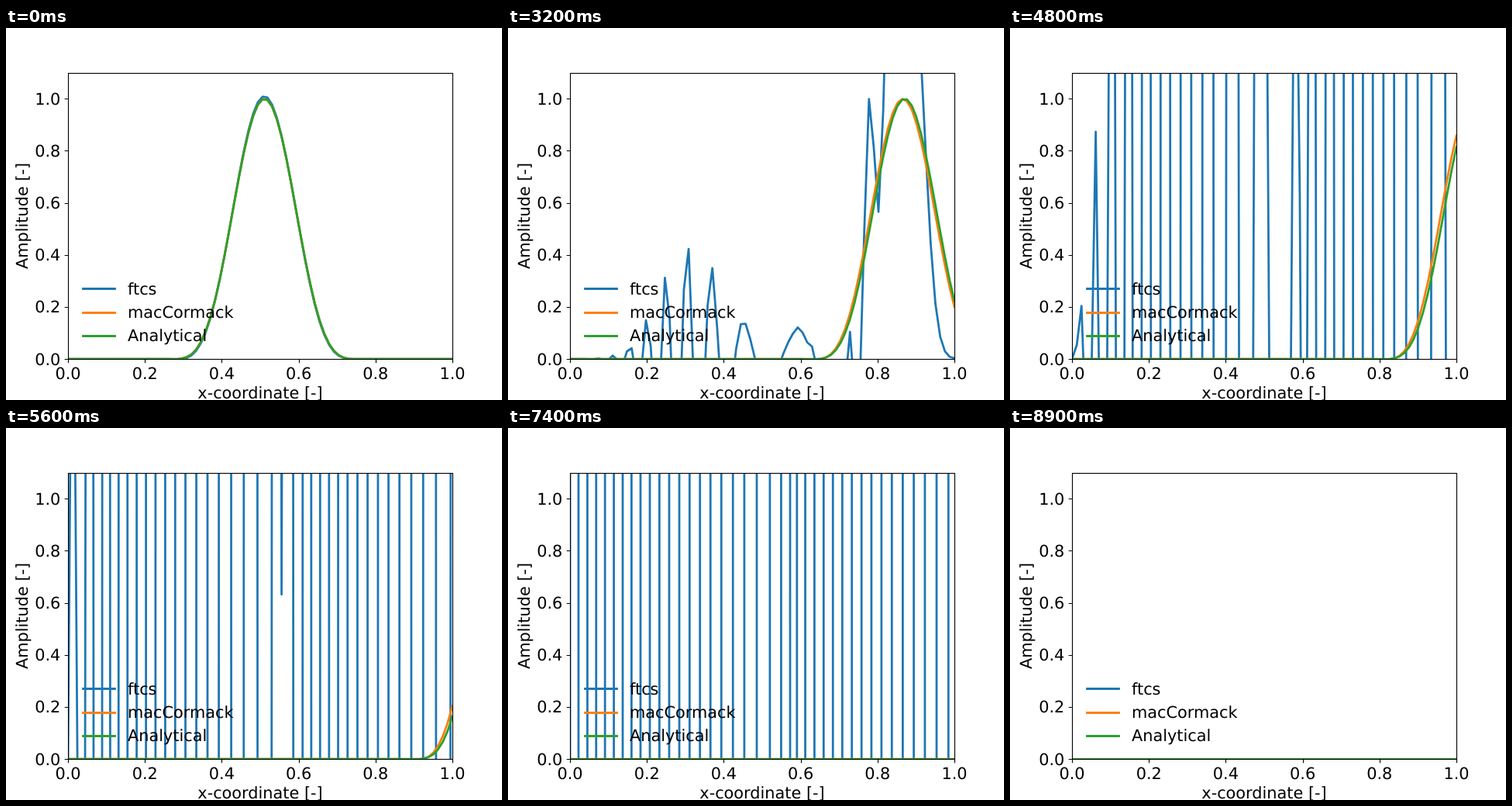
Recreate the animation shown at these times as an HTML page. Size 640x480 px, loop 9000 ms.

```html
<!DOCTYPE html>
<html lang="en">
<head>
<meta charset="utf-8">
<title>Advection schemes</title>
<style>
  html, body { margin: 0; width: 100%; height: 100%; overflow: hidden; background: #fff; }
  svg { display: block; width: 640px; height: 480px; }
  text {
    font: 20.83px "DejaVu Sans", sans-serif;
    font-variant-ligatures: none;
    text-rendering: geometricPrecision;
  }
  .mid { text-anchor: middle; }
  .end { text-anchor: end; }
  .curve { fill: none; stroke-width: 2.78; stroke-linejoin: round; stroke-linecap: square; }
  .axis { fill: none; stroke: #000; stroke-width: 1.11; }
</style>
</head>
<body>
<svg id="stage" viewBox="0 0 640 480">
  <clipPath id="plot"><rect x="80" y="58" width="497" height="370"/></clipPath>
  <g id="curves" clip-path="url(#plot)"></g>
  <g id="axes"></g>
  <g id="legend"></g>
</svg>
<script>
const FRAME_MS = 100, FRAMES = 90;
const CELLS = 81, COURANT = 0.9;
const LEFT = 80, WIDTH = 496, BASE = 427.2, UNIT = 336;
const SERIES = [
  { name: 'ftcs', color: '#1f77b4', lineY: 336.5, textY: 344 },
  { name: 'macCormack', color: '#ff7f0e', lineY: 367.5, textY: 374 },
  { name: 'Analytical', color: '#2ca02c', lineY: 397.5, textY: 404 }
];

function add(parent, tag, attrs, text) {
  const el = document.createElementNS('http://www.w3.org/2000/svg', tag);
  for (const key in attrs) el.setAttribute(key, attrs[key]);
  if (text) el.textContent = text;
  return document.getElementById(parent).appendChild(el);
}

// Numerical schemes for the linear advection equation
const pulse = x => x > 0.25 && x < 0.75 ? Math.sin(2 * Math.PI * (x - 0.25)) ** 4 : 0;
const sample = shift => Array.from({ length: CELLS + 1 }, (_, i) => pulse(i / CELLS - shift));

const ftcs = (u, i) => u[i] - COURANT / 2 * (u[i + 1] - u[i - 1]);

function macCormack(u, i) {
  const predict = j => u[j] - COURANT * (u[j + 1] - u[j]);
  const here = predict(i);
  return 0.5 * (u[i] + here - COURANT * (here - predict(i - 1)));
}

// The right boundary value is interpolated along the characteristic.
const advance = (u, scheme) => u.map((v, i) =>
  i === 0 ? v : i === CELLS ? (1 - COURANT) * v + COURANT * u[i - 1] : scheme(u, i));

// Builds a path, cutting each segment to the stage height.
function toPath(values) {
  const base = values.some(v => v !== 0) ? BASE : 427.5;
  const top = -10, bottom = 490;
  let d = '', last = '';
  for (let i = 0; i < CELLS; i++) {
    const x0 = LEFT + WIDTH * i / CELLS, dx = WIDTH / CELLS;
    const y0 = base - UNIT * values[i], dy = -UNIT * (values[i + 1] - values[i]);
    let from = 0, to = 1;
    if (dy !== 0) {
      const a = (top - y0) / dy, b = (bottom - y0) / dy;
      from = Math.max(0, Math.min(a, b));
      to = Math.min(1, Math.max(a, b));
    } else if (y0 < top || y0 > bottom) continue;
    if (from >= to) continue;
    const point = s => (x0 + s * dx).toFixed(3) + ' ' +
      Math.min(bottom, Math.max(top, y0 + s * dy)).toFixed(3);
    const start = point(from), end = point(to);
    d += (start === last ? '' : 'M' + start) + 'L' + end;
    last = end;
  }
  return d;
}

function simulate() {
  const frames = [];
  let a = sample(0), b = sample(0);
  for (let n = 1; n < FRAMES; n++) {
    a = advance(a, ftcs);
    b = advance(b, macCormack);
    frames.push([a, b, sample(n / (FRAMES - 1))].map(toPath));
  }
  const flat = toPath(new Array(CELLS + 1).fill(0));
  frames.push([flat, flat, flat]);
  return frames;
}

function drawAxes() {
  const snap = v => Math.floor(v + 0.5) + 0.5;
  for (let i = 0; i <= 5; i++) {
    const label = (i / 5).toFixed(1);
    const x = LEFT + WIDTH * i / 5, y = BASE - UNIT * i / 5;
    add('axes', 'path', { class: 'axis', d: `M${snap(x)} 427.5v4.86M80.5 ${snap(y)}h-4.86` });
    add('axes', 'text', { class: 'mid', x, y: 453 }, label);
    add('axes', 'text', { class: 'end', x: 70.3, y: Math.round(y + 7.4) }, label);
  }
  add('axes', 'rect', { class: 'axis', x: 80.5, y: 58.5, width: 496, height: 369 });
  add('axes', 'text', { class: 'mid', x: 328, y: 478 }, 'x-coordinate [-]');
  add('axes', 'text', { class: 'mid', transform: 'translate(28 242.4) rotate(-90)' }, 'Amplitude [-]');
}

function drawLegend() {
  for (const s of SERIES) {
    add('legend', 'path', { class: 'curve', stroke: s.color, d: `M99.5 ${s.lineY}H140.5` });
    add('legend', 'text', { x: 157, y: s.textY }, s.name);
  }
}

drawAxes();
drawLegend();
const curves = SERIES.map(s => add('curves', 'path', { class: 'curve', stroke: s.color }));
const frames = simulate();
let shown = -1;

function render() {
  const index = Math.floor(performance.now() / FRAME_MS) % FRAMES;
  if (index !== shown) {
    curves.forEach((curve, i) => curve.setAttribute('d', frames[index][i]));
    shown = index;
  }
  requestAnimationFrame(render);
}
render();
</script>
</body>
</html>
```
